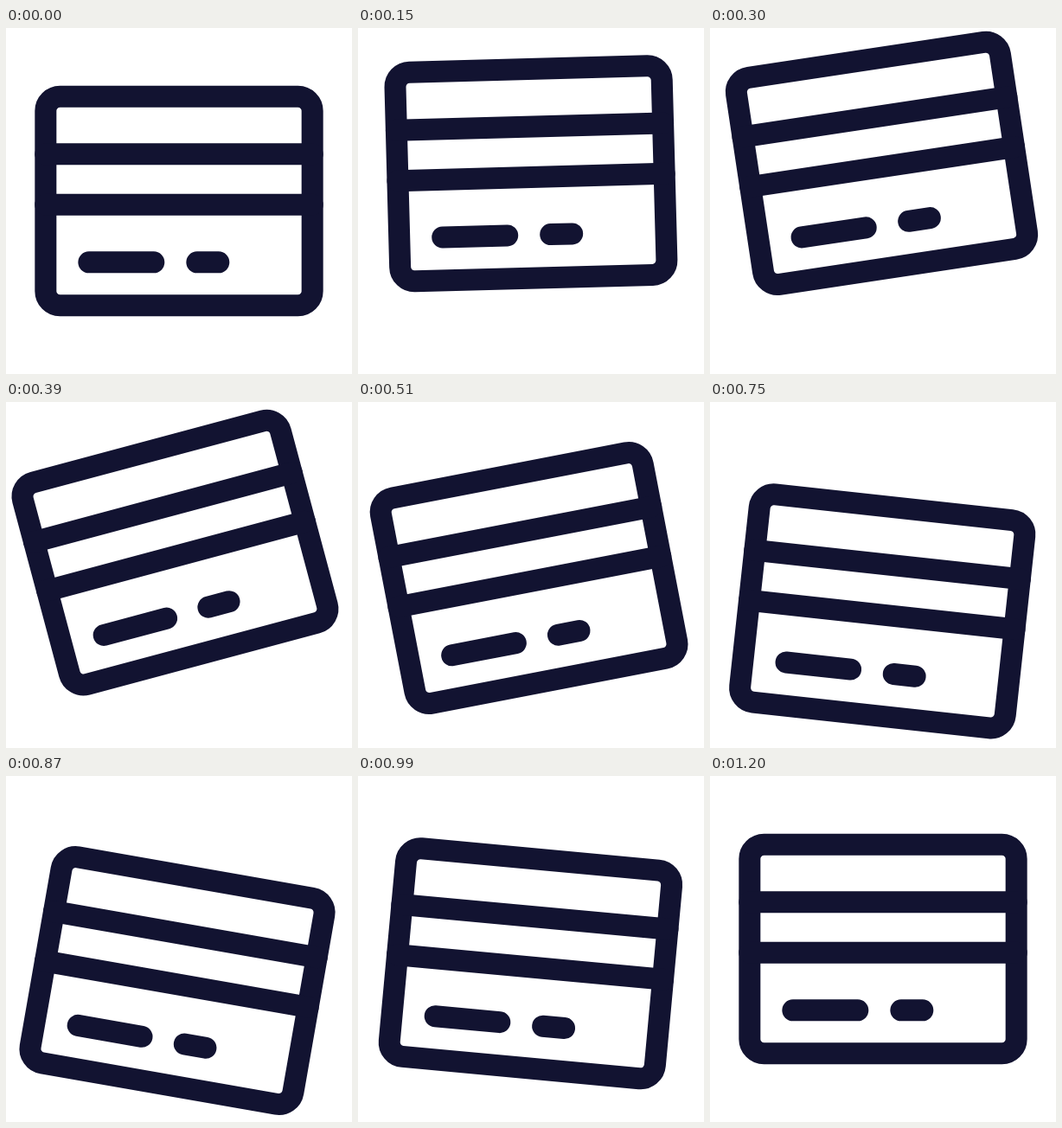
An HTML page for the animation above (3230 ms loop, 400 by 400 pixels).

```html
<!DOCTYPE html>
<html lang="en">
<head>
<meta charset="utf-8">
<title>Card</title>
<style>
  html, body { margin: 0; height: 100%; overflow: hidden; background: #fff; }
  svg { display: block; width: 100vw; height: 100vh; }
</style>
</head>
<body>
<svg viewBox="0 0 400 400">
  <g id="card" fill="none" stroke="#121331" stroke-width="25" stroke-linecap="round">
    <rect x="45.83" y="79.17" width="308.34" height="241.66" rx="16.67"/>
    <path d="M45.83 145.83H354.17M45.83 204.17H354.17M95.83 270.83H170.83M220.83 270.83H245.83"/>
  </g>
</svg>
<script>
const LOOP = 3230, STEP = 30, END = 1200;
const PIVOT = [66.67, 200];
const card = document.getElementById('card');

// Each key: [time, value, x1, x2]; x1 and x2 shape the ease that leads to the key.
const lift = [
  [0, 0],
  [210, -35, .333, .667],
  [630, 33, .375, .25],
  [1200, 0, .333, .333]
];
const tilt = [
  [0, 0],
  [390, -15, .77, .85],
  [850, 10, .318, .74],
  [1200, 0, .41, .36]
];

// cubic-bezier(x1, 0, x2, 1)
function ease(p, x1, x2) {
  let lo = 0, hi = 1;
  for (let i = 0; i < 24; i++) {
    const u = (lo + hi) / 2, v = 1 - u;
    const x = 3 * v * v * u * x1 + 3 * v * u * u * x2 + u * u * u;
    if (x < p) lo = u; else hi = u;
  }
  return lo * lo * (3 - 2 * lo);
}

function valueAt(keys, t) {
  if (t <= 0 || t >= END) return 0;
  const i = keys.findIndex(k => k[0] > t);
  const [t0, a] = keys[i - 1], [t1, b, x1, x2] = keys[i];
  return a + (b - a) * ease((t - t0) / (t1 - t0), x1, x2);
}

const start = performance.now();

function draw(now) {
  const time = Math.max(0, now - start) % LOOP;
  const t = Math.floor(time / STEP) * STEP;
  const y = valueAt(lift, t), angle = valueAt(tilt, t);
  card.setAttribute('transform', `translate(0 ${y}) rotate(${angle} ${PIVOT})`);
  requestAnimationFrame(draw);
}
draw(start);
</script>
</body>
</html>
```
